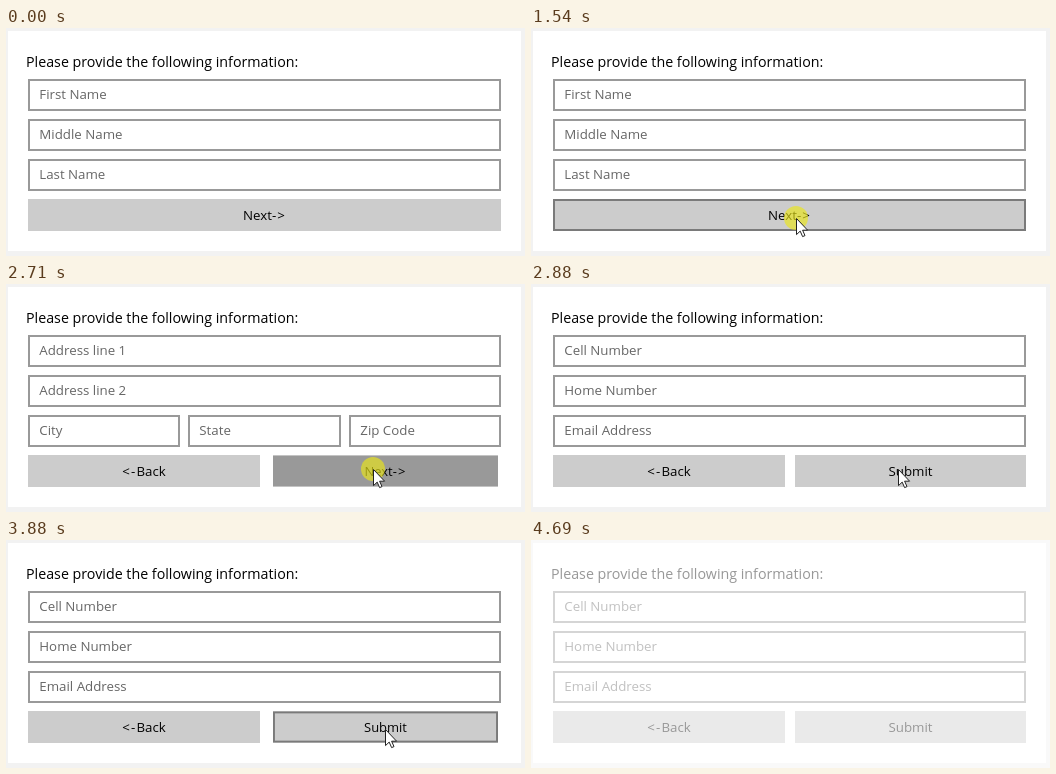
Recreate the animation shown at these times as an HTML page. Size 519 by 228 pixels, loop 5380 ms.

```html
<!DOCTYPE html>
<html lang="en">
<head>
<meta charset="utf-8">
<title>Three step form</title>
<style>
  html, body { margin: 0; width: 100%; height: 100%; overflow: hidden; background: #fff; }
  svg { display: block; width: 519px; height: 228px; font-family: "Open Sans", "Noto Sans", sans-serif; }
  .field { fill: #fff; stroke: #999; stroke-width: 2; }
  .hint { fill: #666; font-size: 13.3px; }
  .label { font-size: 13.3px; text-anchor: middle; }
  .arrow { letter-spacing: 1.1px; }
  .face { fill: #ccc; }
  .edge { fill: none; stroke: #7a7a7a; stroke-width: 2; }
</style>
</head>
<body>
<svg viewBox="0 0 519 228">
  <g id="form">
    <rect width="519" height="228" fill="#f2f2f2"/>
    <rect x="2" y="3" width="513" height="220" fill="#fff"/>
    <text x="20" y="39" font-size="14.25">Please provide the following information:</text>
    <g id="pages"></g>
  </g>
  <circle id="spot" r="12" fill="#ebe619" opacity=".65"/>
  <path id="pointer" d="M.5 .5V16.6L4.2 13.1 6.6 18.6 9 17.6 6.6 12.2H11.6Z" fill="#fff" stroke="#222"/>
</svg>
<script>
const LOOP = 5380;
const byId = id => document.getElementById(id);

const field = (text, row, left = 22, right = 495) => {
  const top = 51 + row * 40;
  return `<rect class="field" x="${left + 1}" y="${top + 1}" width="${right - left - 2}" height="30"/>
    <text class="hint" x="${left + 11.3}" y="${top + 20}">${text}</text>`;
};

const button = (label, left, right, name) => {
  const mid = (left + right) / 2;
  const w = right - left;
  return `<g class="${name}" transform-origin="${mid} 187">
    <rect class="face" x="${left}" y="171" width="${w}" height="32"/>
    <rect class="edge" x="${left + 1}" y="172" width="${w - 2}" height="30" visibility="hidden"/>
    <text class="label" x="${mid}" y="192">${label}</text></g>`;
};

const next = 'Next<tspan class="arrow">-&gt;</tspan>';
const back = button('<tspan class="arrow">&lt;-</tspan>Back', 22, 254, 'back');

const pages = [
  field('First Name', 0) + field('Middle Name', 1) + field('Last Name', 2) +
    button(next, 22, 495, 'main'),
  field('Address line 1', 0) + field('Address line 2', 1) +
    field('City', 2, 22, 174) + field('State', 2, 182, 335) + field('Zip Code', 2, 343, 495) +
    back + button(next, 264, 495, 'main'),
  field('Cell Number', 0) + field('Home Number', 1) + field('Email Address', 2) +
    back + button('Submit', 264, 495, 'main')
];
byId('pages').innerHTML = pages.map(p => `<g>${p}</g>`).join('');

const views = [...byId('pages').children].map(el => ({
  el,
  main: el.querySelector('.main'),
  face: el.querySelector('.main .face'),
  edge: el.querySelector('.main .edge')
}));

// Each step changes only the listed values; the rest carry over.
const steps = [
  [0, { page: 0, at: [250, 228], pointer: 0, spot: 0, hover: 0, dark: 0, scale: 1, fade: 1 }],
  [290, { at: [251, 221], pointer: 1 }],
  [370, { at: [254, 212] }],
  [450, { at: [258, 203] }],
  [520, { at: [259, 201], hover: 1 }],
  [690, { at: [260, 198] }],
  [770, { at: [263, 193] }],
  [850, { at: [265, 190] }],
  [1540, { spot: 1 }],
  [1630, { page: 1, spot: 0, hover: 0 }],
  [1930, { at: [291, 189], hover: 1 }],
  [2000, { at: [344, 186] }],
  [2080, { at: [367, 185] }],
  [2710, { spot: 1, hover: 0, dark: 1, scale: 0.974 }],
  [2880, { page: 2, spot: 0, dark: 0, scale: 1 }],
  [3260, { at: [370, 186], hover: 1 }],
  [3340, { at: [376, 188] }],
  [3410, { at: [379, 189] }],
  [3730, { spot: 1, hover: 0, dark: 1, scale: 0.974 }],
  [3880, { spot: 0, hover: 1, dark: 0 }],
  [3970, { scale: 1, fade: 0.85 }],
  [4050, { fade: 0.7 }],
  [4130, { fade: 0.55 }],
  [4200, { fade: 0.4 }],
  [4270, { hover: 0 }],
  [4600, { pointer: 0.5 }],
  [4690, { pointer: 0 }]
];

const stateAt = t => Object.assign({}, ...steps.filter(s => s[0] <= t).map(s => s[1]));

function draw(t) {
  const s = stateAt(t);
  views.forEach((v, i) => v.el.style.display = i === s.page ? '' : 'none');
  const { main, face, edge } = views[s.page];
  main.setAttribute('transform', `scale(${s.scale})`);
  face.style.fill = s.dark ? '#999' : '#ccc';
  edge.setAttribute('visibility', s.hover ? 'visible' : 'hidden');
  byId('form').setAttribute('opacity', s.fade);

  const [x, y] = s.at;
  byId('pointer').setAttribute('transform', `translate(${x} ${y})`);
  byId('pointer').setAttribute('opacity', s.pointer);
  byId('spot').setAttribute('transform', `translate(${x} ${y})`);
  byId('spot').style.display = s.spot ? '' : 'none';
}

const start = performance.now();
function tick() {
  draw((performance.now() - start) % LOOP);
  requestAnimationFrame(tick);
}
tick();
</script>
</body>
</html>
```
